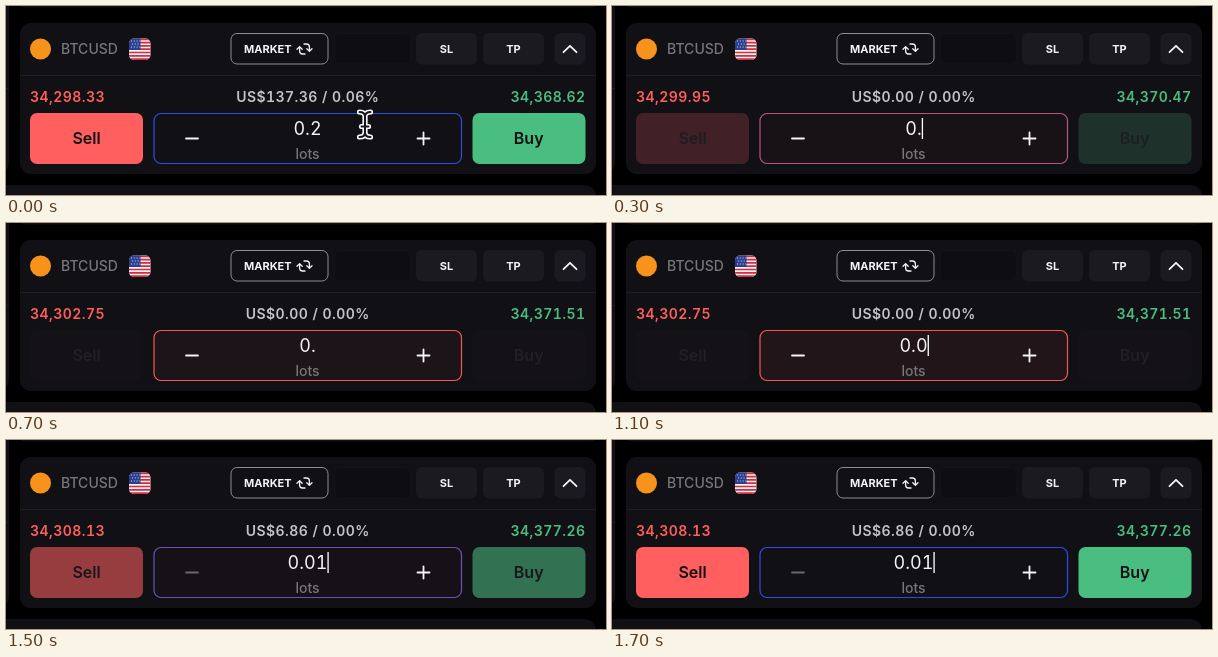
Animation, 600 px wide and 189 px high, one loop 1800 ms. Source, as an HTML page:

```html
<!DOCTYPE html>
<html lang="en">
<head>
<meta charset="utf-8">
<title>Order panel</title>
<style>
  html, body { margin: 0; width: 100%; height: 100%; overflow: hidden; background: #000; }
  svg { display: block; width: 600px; height: 189px; }
  text { font: 600 14px Inter, Roboto, sans-serif; font-feature-settings: "tnum"; }
  .small { font-size: 11px; font-weight: 700; fill: #f4f4f5; }
  .price { letter-spacing: .45px; }
  .mid { text-anchor: middle; }
  .end { text-anchor: end; }
  .line { fill: none; stroke: #f4f4f5; stroke-width: 1.8; stroke-linecap: round; stroke-linejoin: round; }
</style>
</head>
<body>
<svg viewBox="0 0 600 189">
  <defs><clipPath id="flagClip"><rect x="123" y="32.5" width="21.5" height="21.5" rx="5"/></clipPath></defs>

  <g fill="#111015">
    <path d="M14 0H590Q587 1.5 580 1.5H24Q17 1.5 14 0Z"/>
    <path d="M0 0H3V155Q3 161 0 164Z"/>
    <path d="M0 179H578Q588 179 590 189H0Z"/>
    <rect x="14" y="17" width="576" height="151" rx="11"/>
  </g>
  <path d="M0 82.5H3M14 69.5H590" stroke="#1e1d23"/>

  <circle cx="34.5" cy="43" r="10.5" fill="#f7931a"/>
  <text x="55" y="48" fill="#77767b" style="font-weight:500">BTCUSD</text>
  <g clip-path="url(#flagClip)">
    <rect x="123" y="32" width="22" height="22" fill="#f2f0f2"/>
    <path d="M123 33.3H145M123 36.6H145M123 39.9H145M123 43.2H145M123 46.5H145M123 49.8H145M123 53.1H145" stroke="#cf2f42" stroke-width="1.7"/>
    <rect x="123" y="32" width="11.5" height="12" fill="#28408f"/>
    <path d="M125 35H134M126 38H134M125 41H134" stroke="#d5daef" stroke-dasharray="1 1.8"/>
  </g>

  <rect x="225" y="27.5" width="97" height="30.5" rx="6" fill="#111015" stroke="#8e8d92"/>
  <text class="small" x="238" y="47">MARKET</text>
  <path class="line" style="stroke-width:1.3" d="M291 43.2L293.6 40.6 296.2 43.2M293.6 41V45Q293.6 48 296.6 48H299M306 42.8L303.4 45.4 300.8 42.8M303.4 45V41Q303.4 38 300.4 38H298"/>
  <rect x="328.5" y="27.5" width="76" height="30.5" rx="6" fill="#0e0d12" stroke="#141318"/>
  <g fill="#1b1a20">
    <rect x="410" y="27" width="61" height="31.5" rx="6"/>
    <rect x="477" y="27" width="61" height="31.5" rx="6"/>
    <rect x="548.5" y="27" width="31" height="31.5" rx="6"/>
  </g>
  <text class="small mid" x="440.5" y="47">SL</text>
  <text class="small mid" x="507.5" y="47">TP</text>
  <path class="line" d="M557.5 46.2L564 39.8 570.5 46.2"/>

  <text id="bid" class="price" x="24" y="96" fill="#ff5f5a"></text>
  <text id="spread" class="price mid" x="301.7" y="96" fill="#c4c3c7"></text>
  <text id="ask" class="price end" x="579.5" y="96" fill="#4abd80"></text>

  <rect id="sell" x="24" y="107" width="113" height="51" rx="7"/>
  <text id="sellText" class="mid" x="80.5" y="138" style="font-size:16px">Sell</text>
  <rect id="buy" x="466.5" y="107" width="113" height="51" rx="7"/>
  <text id="buyText" class="mid" x="522.7" y="138" style="font-size:16px">Buy</text>

  <rect id="field" x="148" y="107.5" width="307.5" height="50" rx="7" stroke-width="1.2"/>
  <path id="minus" class="line" d="M180 132.5H192"/>
  <path class="line" d="M411.5 132.5H423.5M417.5 126.5V138.5"/>
  <text id="lots" class="mid" x="301.5" y="129" fill="#f4f4f5" style="font-size:18px;font-weight:400"></text>
  <rect id="caret" y="112" width="1.3" height="21" fill="#fff"/>
  <text class="mid" x="301.5" y="153" fill="#77767b" style="font-weight:500">lots</text>

  <g id="cursor" fill="none" stroke-linecap="round" stroke-linejoin="round">
    <path id="beam" d="M353.5 106Q359 106 359 110.5Q359 106 364.5 106M359 110V127M353.5 131Q359 131 359 126.5Q359 131 364.5 131M355.5 120.5H362.5" stroke="#fff" stroke-width="5.2"/>
    <use href="#beam" style="stroke:#16151a"/>
    <path d="M353.5 106Q359 106 359 110.5Q359 106 364.5 106M359 110V127M353.5 131Q359 131 359 126.5Q359 131 364.5 131M355.5 120.5H362.5" stroke="#16151a" stroke-width="2"/>
  </g>
</svg>
<script>
const LOOP = 1800, STEP = 100;
const $ = id => document.getElementById(id);
document.querySelector('#cursor use').remove();

// Each track holds a value from its start time until the next entry.
const quotes = [
  [0, ['34,298.33', '34,368.62']], [200, ['34,299.95', '34,370.47']],
  [500, ['34,302.75', '34,371.51']], [1300, ['34,305.25', '34,378.76']],
  [1500, ['34,308.13', '34,377.26']]
];
const spreads = [[0, 'US$137.36 / 0.06%'], [200, 'US$0.00 / 0.00%'], [1500, 'US$6.86 / 0.00%']];
const typed = [[0, '0.2'], [200, '0.'], [900, '0.0'], [1500, '0.01']];
const carets = [[0, false], [100, true], [700, false], [900, true]];
// Eased tracks: button strength, border alarm, field tint.
const strength = [[0, 1], [200, .65], [300, .19], [400, .05], [500, 0], [1500, .56], [1600, .9], [1700, 1]];
const alarm = [[0, 0], [200, .35], [300, .7], [400, .93], [500, 1], [1500, .32], [1600, .08], [1700, 0]];
const tints = [[0, 0], [300, .03], [500, .05], [900, .07], [1500, .02], [1700, 0]];

const hold = (track, t) => track.findLast(([start]) => start <= t)[1];
const mix = (a, b, k) => `rgb(${a.map((v, i) => Math.round(v + (b[i] - v) * k))})`;

const PANEL = [17, 16, 21], OFF = [20, 18, 23], OFF_TEXT = [33, 32, 38];
const RED = [255, 95, 95], GREEN = [74, 189, 128], BLUE = [46, 76, 232], ALERT = [245, 88, 80];

function draw(now) {
  const t = Math.floor(now % LOOP / STEP) * STEP;
  const [bid, ask] = hold(quotes, t);
  $('bid').textContent = bid;
  $('ask').textContent = ask;
  $('spread').textContent = hold(spreads, t);

  const on = hold(strength, t);
  $('sell').setAttribute('fill', mix(OFF, RED, on));
  $('buy').setAttribute('fill', mix(OFF, GREEN, on));
  for (const id of ['sellText', 'buyText']) $(id).setAttribute('fill', mix(OFF_TEXT, PANEL, on));

  $('field').setAttribute('stroke', mix(BLUE, ALERT, hold(alarm, t)));
  $('field').setAttribute('fill', mix(PANEL, ALERT, hold(tints, t)));
  $('minus').style.stroke = t < 1500 ? '#f4f4f5' : '#68676c';

  $('lots').textContent = hold(typed, t);
  $('caret').setAttribute('x', 301.5 + $('lots').getComputedTextLength() / 2);
  $('caret').style.opacity = +hold(carets, t);
  $('cursor').style.opacity = +(t < 200);
}

const start = performance.now();
function tick() {
  draw(performance.now() - start);
  requestAnimationFrame(tick);
}
tick();
</script>
</body>
</html>
```
